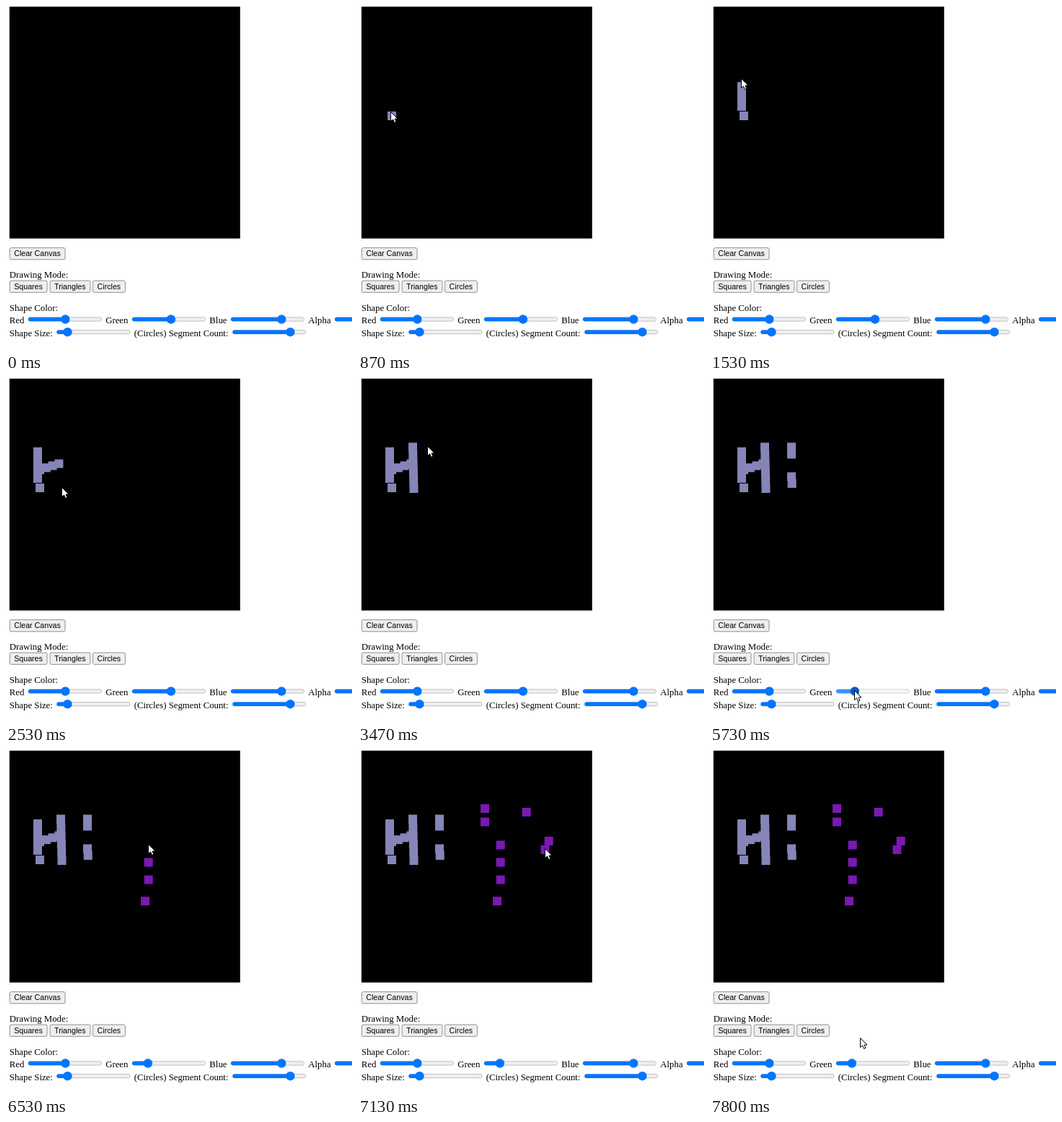
An HTML page with a canvas that plays this animation: 480x476 px, repeating every 8000 ms.

```html
<!DOCTYPE html>
<html lang="en">
<head>
<meta charset="utf-8">
<title>Shape painter</title>
<style>
  html, body { margin: 0; width: 480px; height: 476px; overflow: hidden; background: #fff; }
  canvas, svg { position: absolute; left: 0; top: 0; }
  text { font: 12.8px "Liberation Serif", "Times New Roman", serif; fill: #000; }
  .btn { font: 10.667px "Liberation Sans", Arial, sans-serif; }
</style>
</head>
<body>
<canvas id="stage" width="480" height="476"></canvas>
<svg width="480" height="476">
  <text class="btn" x="11.2" y="346">Clear Canvas</text>
  <text x="4.8" y="376.4">Drawing Mode:</text>
  <text class="btn" x="11.2" y="392">Squares</text>
  <text class="btn" x="67.1" y="392">Triangles</text>
  <text class="btn" x="126.6" y="392">Circles</text>
  <text x="4.8" y="422">Shape Color:</text>
  <text x="4.8" y="439.4">Red</text>
  <text x="138.2" y="439.4">Green</text>
  <text x="282.3" y="439.4">Blue</text>
  <text x="419.3" y="439.4">Alpha</text>
  <text x="4.8" y="457">Shape Size:</text>
  <text x="177.7" y="457">(Circles) Segment Count:</text>
  <path id="cursor" d="M.5 .5V13.6L3.6 10.9L5.6 15.4L7.9 14.4L6 10H10Z" fill="#fff" stroke="#000"/>
</svg>
<script>
const ctx = document.getElementById('stage').getContext('2d');
const cursor = document.getElementById('cursor');
const LOOP = 8000, STEP = 1000 / 15, DAB = 12;
const BLUE = '#0075ff', LILAC = '#8585b8', PURPLE = '#7919b2';
const GREEN_HIGH = 228.9, GREEN_LOW = 196.9, DRAG_START = 79, DRAG_END = 87;

// The pointer glides from key to key; each brush stroke adds its two ends.
const keys = [], dabs = [];

function move(at, x, y, hold = 0) {
  keys.push({ at, x, y }, { at: at + hold, x, y });
}

// A dab shows one step after the pointer has passed it.
function stroke(color, at, x, y, count = 1, dx = 0, dy = 0, every = 1) {
  for (let i = 0; i < count; i++) {
    dabs.push({ at: at + i * every + 1, x: x + i * dx, y: y + i * dy, color });
  }
  const last = count - 1;
  move(at, x, y);
  move(at + last * every, x + last * dx, y + last * dy);
}

move(1, 300, 87);
move(4, 86, 152, 2);

// H
stroke(LILAC, 12, 47, 152);
stroke(LILAC, 15, 44, 139, 5, 0, -9.25, 2);
stroke(LILAC, 27, 47, 127, 4, 8.8, -2.8, 2);
stroke(LILAC, 38, 77.5, 153, 6, -0.3, -11.5, 2);
// i
stroke(LILAC, 55, 113, 95.5, 2, 0, 10, 2);
stroke(LILAC, 64, 113, 136.5, 2, 0.7, 9.5, 2);

// lower the green value
move(68, 113.7, 146);
move(72, 161, 291, 2);
move(DRAG_START, GREEN_HIGH, 434);
move(DRAG_END, GREEN_LOW, 434);

// question mark
move(92, 193, 209);
stroke(PURPLE, 94, 193, 209);
stroke(PURPLE, 96, 197.7, 179.5, 3, 0, -24);
stroke(PURPLE, 100, 176, 99.5, 2, 0, -18.5);
stroke(PURPLE, 103, 233.7, 86);
stroke(PURPLE, 104, 264.7, 126, 2, -5.2, 12);

move(107, 259.5, 138);
move(110, 231, 331, 2);
move(117, 209, 400);

function pointAt(n) {
  const next = keys.findIndex(k => k.at > n);
  if (next < 1) return next ? keys[keys.length - 1] : keys[0];
  const a = keys[next - 1], b = keys[next];
  const k = (n - a.at) / (b.at - a.at);
  return { x: a.x + (b.x - a.x) * k, y: a.y + (b.y - a.y) * k };
}

function rounded(x, y, w, h, r, fill, line) {
  ctx.beginPath();
  ctx.roundRect(x, y, w, h, r);
  ctx.fillStyle = fill;
  ctx.fill();
  if (!line) return;
  ctx.strokeStyle = line;
  ctx.lineWidth = 0.8;
  ctx.stroke();
}

function button(x, y, w) {
  rounded(x + 0.4, y + 0.4, w - 0.8, 16.2, 2, '#efefef', '#767676');
}

function slider(x, y, thumb, active) {
  const left = x + 0.6, r = 2.8;
  rounded(left + 0.4, y - 2.6, 101.2, 5.2, r, active ? '#f5f5f5' : '#efefef', active ? '#cbcbcb' : '#b2b2b2');
  rounded(left, y - r, thumb - left, 2 * r, [r, 0, 0, r], active ? '#3793ff' : BLUE);
  ctx.beginPath();
  ctx.arc(thumb, y, 6.2, 0, 2 * Math.PI);
  ctx.fillStyle = active ? '#005cc8' : BLUE;
  ctx.fill();
}

function draw(t) {
  const n = Math.floor(t / STEP + 0.1);
  const { x, y } = pointAt(n);
  const dragging = n >= DRAG_START && n <= DRAG_END;
  const green = dragging ? x : n < DRAG_START ? GREEN_HIGH : GREEN_LOW;

  ctx.clearRect(0, 0, 480, 476);
  ctx.fillStyle = '#000';
  ctx.fillRect(4.8, 0.9, 320, 320.8);
  for (const d of dabs) {
    if (n < d.at) continue;
    ctx.fillStyle = d.color;
    ctx.fillRect(d.x - DAB / 2, d.y - DAB / 2, DAB, DAB);
  }

  button(4.8, 334.2, 77.6);
  button(4.8, 379.7, 52.6);
  button(60.7, 379.7, 56.5);
  button(120.2, 379.7, 45.6);

  slider(30.2, 433.5, 82.3);
  slider(174.3, 433.5, green, dragging);
  slider(311.3, 433.5, 382.3);
  slider(455.4, 433.5, 552);
  slider(69.7, 451.2, 85.4);
  slider(313.7, 451.2, 394.4);

  cursor.setAttribute('visibility', n < 1 ? 'hidden' : 'visible');
  cursor.setAttribute('transform', `translate(${Math.round(x - 1)} ${Math.round(y - 2)})`);
}

const start = performance.now();
function tick() {
  draw((performance.now() - start) % LOOP);
  requestAnimationFrame(tick);
}
tick();
</script>
</body>
</html>
```
